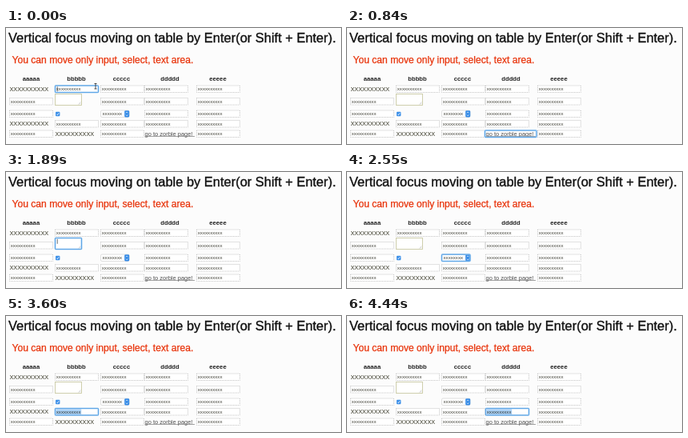
Recreate the animation shown at these times as an HTML page. Size 419 px wide and 145 px high, loop 4.47 s.

```html
<!DOCTYPE html>
<html lang="en">
<head>
<meta charset="utf-8">
<style>
  html, body { margin: 0; width: 100%; height: 100%; overflow: hidden; background: #fcfcfc; }
  svg { display: block; font-family: "Liberation Sans", Arial, sans-serif; fill: #222; }
  .title { font-size: 16.45px; fill: #111; stroke: #111; stroke-width: .35px; }
  .note { font-size: 12.1px; fill: #e8330a; stroke: #e8330a; stroke-width: .25px; }
  .head { font-size: 7.7px; font-weight: bold; text-anchor: middle; }
  .plain { font-size: 7.3px; fill: #333322; }
  .value { font-size: 6.15px; fill: #44443a; }
  .link { font-size: 7.5px; fill: #555; }
  .box { fill: #fff; stroke: #b8b8b8; stroke-width: .8px; stroke-dasharray: 1 1; }
  .area { fill: #fff; stroke: #c9c9a4; stroke-width: .9px; }
</style>
</head>
<body>
<svg id="stage" width="419" height="145" viewBox="0 0 419 145"></svg>
<script>
const stage = document.getElementById('stage');

function add(tag, attrs, text = '') {
  const el = document.createElementNS('http://www.w3.org/2000/svg', tag);
  for (const key in attrs) el.setAttribute(key, attrs[key]);
  el.textContent = text;
  return stage.appendChild(el);
}
const label = (cls, x, y, text) => add('text', { class: cls, x, y }, text);
const rect = (x, y, width, height, attrs) => add('rect', { x, y, width, height, ...attrs });

label('title', 3, 18, 'Vertical focus moving on table by Enter(or Shift + Enter).');
label('note', 7.5, 44, 'You can move only input, select, text area.');

const columns = [
  { x: 4.5, mid: 31.5 }, { x: 61.5, mid: 88 }, { x: 118.5, mid: 144.5 },
  { x: 173.5, mid: 205 }, { x: 238.5, mid: 265 }
];
const rowTops = [72, 87.5, 103, 115.5, 128];
const special = { a1: 'plain', a4: 'plain', b5: 'plain', b2: 'area', b3: 'check', c3: 'select', d5: 'link' };

// Draws one cell and returns its focus rectangle, or nothing for plain text.
function drawCell(kind, x, y) {
  let w = 54, h = 8.5;
  switch (kind) {
    case 'plain':
      label('plain', x, y + 6.6, 'XXXXXXXXXX');
      return;
    case 'area':
      y = 82.5; w = 33; h = 14;
      rect(x, y, w, h, { class: 'area' });
      add('path', { d: `M${x + w - 4} ${y + h - 1}l3-3m-1.5 3l1.5-1.5`, stroke: '#aaa', 'stroke-width': .5 });
      break;
    case 'check':
      x = 62; y = 104.8; w = h = 5.4;
      rect(x, y, w, h, { rx: 1, fill: '#3b8fe8' });
      add('path', { d: `M${x + 1.3} ${y + 2.8}l1.1 1.3l1.8-2.8`, fill: 'none', stroke: '#fff', 'stroke-width': .8 });
      break;
    case 'select':
      w = 35.5;
      rect(x, y, w, h, { rx: 1.5, fill: '#fff', stroke: '#ccc', 'stroke-width': .6 });
      label('value', x + 2, y + 6.2, 'xxxxxxxx');
      rect(x + 29.7, y + .2, 6, 8.2, { rx: 1.3, fill: '#348ae6' });
      add('path', { d: `M${x + 31.3} ${y + 3.4}l1.4-1.5l1.4 1.5m-2.8 2l1.4 1.5l1.4-1.5`, fill: 'none', stroke: '#fff', 'stroke-width': .7 });
      break;
    case 'link':
      label('link', x, y + 6.5, 'go to zorble page!');
      rect(x, y + 7.4, 62.5, .6, { fill: '#666' });
      x -= 1; w = 64.5;
      break;
    default:
      rect(x, y, w, h, { class: 'box' });
      label('value', x + 1.3, y + 6.2, 'xxxxxxxxxx');
  }
  return { kind, x, y, w, h };
}

const fields = [];
columns.forEach(({ x, mid }, c) => {
  const letter = 'abcde'[c];
  label('head', mid, 66, letter.repeat(5));
  rowTops.forEach((y, r) => {
    const field = drawCell(special[letter + (r + 1)] || 'input', x, y);
    if (field) fields.push(field);
  });
});

const glow = add('rect', { rx: 1.2, fill: 'none', stroke: '#8fc3f3', 'stroke-width': 2.2, opacity: .65 });
const ring = add('rect', { rx: .6, fill: 'none', stroke: '#5ea6e6', 'stroke-width': 1 });
const selection = rect(0, 0, 31.5, 6.6, { fill: '#acd2f6' });
selection.style.mixBlendMode = 'multiply';
const caret = rect(0, 0, .7, 6, { fill: '#333' });
const pointer = add('path', { d: 'M110.5 69.5h3m-1.5 0v6.5m-1.5 0h3', fill: 'none', stroke: '#222', 'stroke-width': .8 });

const period = 4470;
// Time and field index where the key repeat turns round or changes pace.
const route = [[0, 3], [840, 16], [970, 18], [1350, 12], [1890, 4], [2030, 2],
  [2550, 9], [2985, 15], [3600, 6], [3735, 4], [4440, 15], [period, 15]];

function focusAt(time) {
  const next = route.findIndex(([t]) => t > time);
  const [t0, i0] = route[next - 1], [t1, i1] = route[next];
  return Math.round(i0 + (i1 - i0) * (time - t0) / (t1 - t0));
}

const show = (el, on) => el.setAttribute('visibility', on ? 'visible' : 'hidden');

function place(el, x, y, width, height) {
  for (const [key, value] of Object.entries({ x, y, width, height })) el.setAttribute(key, value);
}

function draw() {
  const time = performance.now() % period;
  const { kind, x, y, w, h } = fields[focusAt(time)];
  const clicked = time < 60;
  place(glow, x, y, w, h);
  place(ring, x, y, w, h);
  place(selection, x + 1.2, y + 1, 31.5, 6.6);
  place(caret, x + 2.3, y + 1.3, .7, 6);
  show(selection, kind === 'input' && !clicked);
  show(caret, kind === 'area' || clicked && kind === 'input');
  show(pointer, clicked);
  requestAnimationFrame(draw);
}
draw();
</script>
</body>
</html>
```
